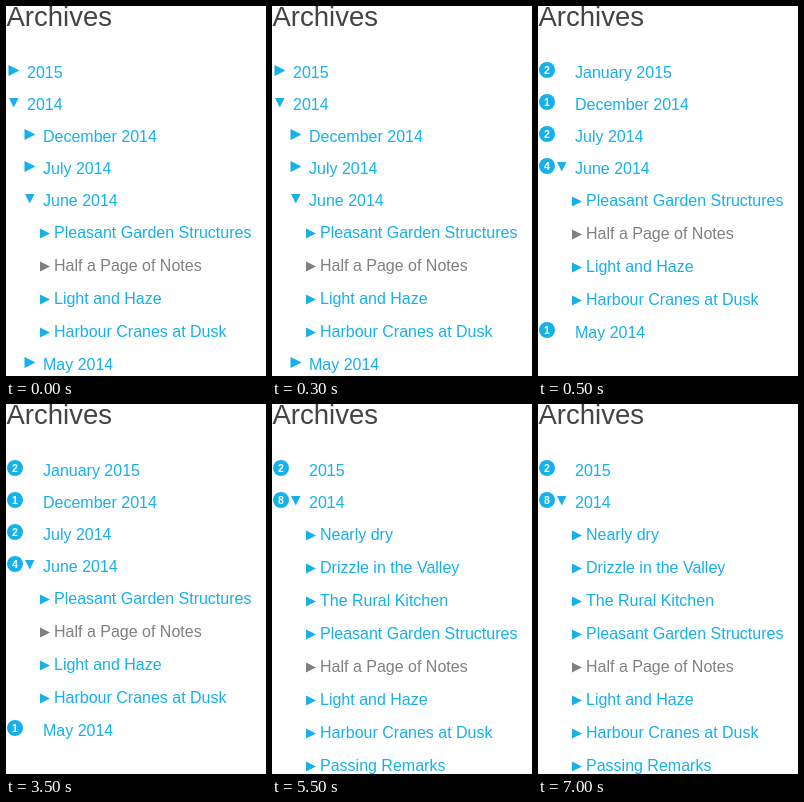
An HTML page with a canvas that plays this animation: 260 by 370 pixels, repeating every 8000 ms.

```html
<!DOCTYPE html>
<html lang="en">
<head>
<meta charset="utf-8">
<title>Archives</title>
<style>
  html, body { margin: 0; width: 100%; height: 100%; overflow: hidden; background: #fff; }
  canvas { display: block; width: 260px; height: 370px; }
</style>
</head>
<body>
<canvas id="stage"></canvas>
<script>
const W = 260, H = 370, LOOP = 8000;
const BLUE = '#16b0ea', GRAY = '#808080', DARK = '#444444';
const FONT = '"Liberation Sans", Arial, sans-serif';

const canvas = document.getElementById('stage');
const ctx = canvas.getContext('2d');
const scale = window.devicePixelRatio || 1;
canvas.width = Math.round(W * scale);
canvas.height = Math.round(H * scale);

const junePosts = [
  'Pleasant Garden Structures',
  'Half a Page of Notes',
  'Light and Haze',
  'Harbour Cranes at Dusk'
];
const current = junePosts[1];

const post = label => ({ label, post: true });
const group = (label, x, open = false) => ({ label, x, open, arrow: x - 18 });
const counted = (label, count, open = false) =>
  ({ label, x: 37, count, open, arrow: open ? 19 : null });

const views = [
  { until: 500, rows: [
    group('2015', 21),
    group('2014', 21, true),
    group('December 2014', 37),
    group('July 2014', 37),
    group('June 2014', 37, true),
    ...junePosts.map(post),
    group('May 2014', 37)
  ] },
  { until: 5500, rows: [
    counted('January 2015', 2),
    counted('December 2014', 1),
    counted('July 2014', 2),
    counted('June 2014', 4, true),
    ...junePosts.map(post),
    counted('May 2014', 1)
  ] },
  { until: LOOP, rows: [
    counted('2015', 2),
    counted('2014', 8, true),
    ...['Nearly dry', 'Drizzle in the Valley', 'The Rural Kitchen',
      ...junePosts, 'Passing Remarks'].map(post)
  ] }
];

function text(label, x, y, size, color, weight = 'normal') {
  ctx.font = `${weight} ${size}px ${FONT}`;
  ctx.fillStyle = color;
  ctx.fillText(label, x, y);
}

function triangle(points, color) {
  ctx.fillStyle = color;
  ctx.beginPath();
  points.forEach(([x, y]) => ctx.lineTo(x, y));
  ctx.fill();
}

const arrowRight = (x, y, size, color) =>
  triangle([[x, y - size / 2], [x + size, y], [x, y + size / 2]], color);
const arrowDown = (x, y, size) =>
  triangle([[x, y], [x + size, y], [x + size / 2, y + size]], BLUE);

function badge(count, y) {
  ctx.fillStyle = BLUE;
  ctx.beginPath();
  ctx.arc(9, y, 8, 0, Math.PI * 2);
  ctx.fill();
  ctx.textAlign = 'center';
  text(count, 9, y + 4, 10.5, '#fff', 'bold');
  ctx.textAlign = 'left';
}

function drawRow(row, y) {
  if (row.post) {
    const color = row.label === current ? GRAY : BLUE;
    arrowRight(34, y - 4.5, 10, color);
    text(row.label, 48, y, 16, color);
    return;
  }
  if (row.count) badge(row.count, y - 8);
  if (row.open) arrowDown(row.arrow, y - 12, 9.5);
  else if (row.arrow !== null) arrowRight(row.arrow - 0.5, y - 7.5, 11, BLUE);
  text(row.label, row.x, y, 16, BLUE);
}

function draw(now) {
  const t = now % LOOP;
  const view = views.find(v => t < v.until);
  ctx.setTransform(scale, 0, 0, scale, 0, 0);
  ctx.fillStyle = '#fff';
  ctx.fillRect(0, 0, W, H);
  text('Archives', 0.5, 20, 27.5, DARK);
  let y = 72;
  for (const row of view.rows) {
    drawRow(row, y);
    y += row.post ? 33 : 32;
  }
}

const start = performance.now();
function tick() {
  draw(performance.now() - start);
  requestAnimationFrame(tick);
}
tick();
</script>
</body>
</html>
```
